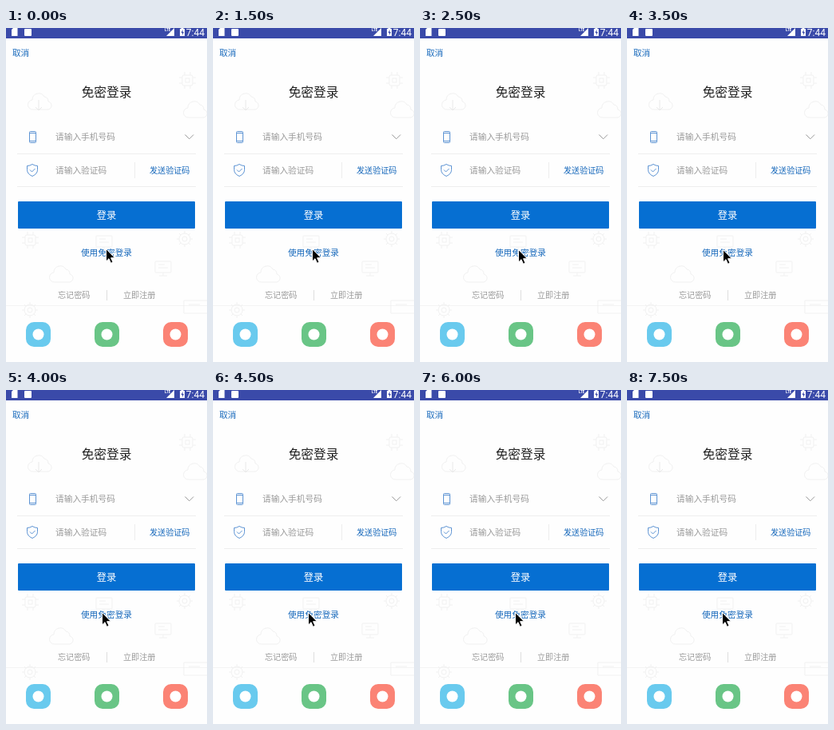
These frames come from a looping animation (252 px wide and 418 px high, 8 s). An HTML page:

```html
<!DOCTYPE html>
<html lang="zh-CN">
<head>
<meta charset="utf-8">
<title>免密登录</title>
<style>
  html, body { margin: 0; width: 100%; height: 100%; overflow: hidden; background: #fefefe; }
  svg { display: block; width: 100%; height: 100%; }
  text { font-family: "Noto Sans CJK SC", "Noto Sans CJK", "Noto Sans", sans-serif; font-size: 10.1px; }
  .mid { text-anchor: middle; }
  .link { fill: #1668bb; }
  .hint { fill: #999; font-size: 10.7px; }
  .small { fill: #999; }
  .clock { font: 12px Roboto, sans-serif; fill: #fff; }
  .lte { font: 700 4.5px Roboto, sans-serif; fill: #fff; }
  .rule { stroke: #eee; }
  .icon { fill: none; stroke: #5c93d3; }
  .doodle { fill: none; stroke: #f1f1f1; }
  .cursor { animation: drift 8s step-end infinite; }
  @keyframes drift {
    0% { transform: translate(125px, 276px); }
    18.75% { transform: translate(124px, 276px); }
    31.25% { transform: translate(123px, 277px); }
    43.75% { transform: translate(120px, 277px); }
    50% { transform: translate(120px, 278px); }
    56.25%, 100% { transform: translate(119px, 278px); }
  }
</style>
</head>
<body>
<svg viewBox="0 0 252 418">
  <defs>
    <path id="cloud" d="M7 23a6 6 0 0 1-1-12 8 8 0 0 1 15-4 6 6 0 0 1 5 6 5 5 0 0 1-2 10z"/>
    <g id="chip">
      <rect x="4" y="4" width="13" height="13" rx="2"/>
      <rect x="8" y="8" width="5" height="5"/>
      <path d="M0 7h4M0 14h4M17 7h4M17 14h4M7 0v4M14 0v4M7 17v4M14 17v4"/>
    </g>
    <g id="gear">
      <circle cx="10" cy="10" r="7"/>
      <circle cx="10" cy="10" r="3"/>
      <path d="M10 0v3M10 17v3M0 10h3M17 10h3M3 3l2 2M15 15l2 2M17 3l-2 2M5 15l-2 2"/>
    </g>
    <g id="screen">
      <rect width="20" height="14" rx="1"/>
      <path d="M4 4h8M4 8h12M10 14v4M5 18h10"/>
    </g>
  </defs>

  <rect width="252" height="418" fill="#fefefe"/>

  <!-- backdrop -->
  <g class="doodle">
    <use href="#cloud" x="27" y="79"/>
    <path d="M41 90v13M37 99l4 4 4-4" stroke="#e9e9e9"/>
    <use href="#chip" x="217" y="55"/>
    <use href="#cloud" x="222" y="89"/>
    <use href="#chip" x="20" y="255"/>
    <use href="#screen" x="113" y="260"/>
    <use href="#gear" x="214" y="254"/>
    <use href="#cloud" x="54" y="295"/>
    <use href="#screen" x="187" y="292"/>
    <use href="#gear" x="20" y="343"/>
    <path d="M223 341h29M223 341v16h29M229 346h14"/>
  </g>

  <!-- status bar -->
  <rect width="252" height="13" fill="#3a4aa9"/>
  <g fill="#fff">
    <path d="M9 0h5.5v10H7V2z"/>
    <rect x="23" y="1" width="9" height="9" rx="1"/>
    <path d="M211 0v10h-10z"/>
    <path d="M218 1h1.5V0h3v1h1.5v9h-6z"/>
  </g>
  <path d="M221.6 2l-2 4h1.4v3l2-4h-1.4z" fill="#3a4aa9"/>
  <text class="lte" x="199" y="4">LTE</text>
  <text class="clock" x="249" y="9.5" text-anchor="end">7:44</text>

  <text class="link" x="8" y="34.5" style="font-size:10.6px">取消</text>
  <text class="mid" x="126" y="86" fill="#222" style="font-size:15.7px">免密登录</text>

  <!-- form -->
  <g class="icon">
    <rect x="29.5" y="129.5" width="8" height="14" rx="1"/>
    <path d="M29.5 131.5h8M29.5 141.5h8"/>
    <path d="M33 170.5q3 2 6.500 2v5q0 5-6.500 8q-6.500-3-6.500-8v-5q3.500 0 6.500-2z"/>
    <path d="M30 177.500l2.500 2.500 4-4"/>
  </g>
  <text class="hint" x="62" y="140">请输入手机号码</text>
  <path d="M224.500 133.500l5.300 5.300 5.300-5.300" fill="none" stroke="#999"/>
  <text class="hint" x="62" y="182">请输入验证码</text>
  <text class="link" x="180" y="181.500">发送验证码</text>
  <path class="rule" d="M14 157.500h224M14 198.500h224M161.500 168v20"/>

  <rect x="15" y="217" width="222" height="34" rx="1" fill="#066fd2"/>
  <text class="mid" x="126" y="238.500" fill="#fff" style="font-size:12.300px">登录</text>
  <text class="link mid" x="126" y="284.500" style="font-size:10.700px">使用免密登录</text>

  <text class="small" x="65" y="338">忘记密码</text>
  <text class="small" x="147" y="338">立即注册</text>
  <path d="M126.500 328v13" stroke="#ddd"/>
  <path class="rule" d="M0 347.500h252" opacity=".6"/>

  <!-- sign-in tiles -->
  <g>
    <rect x="25" y="368" width="31" height="31" rx="10" fill="#69caee"/>
    <rect x="111" y="368" width="31" height="31" rx="10" fill="#69c586"/>
    <rect x="197" y="368" width="31" height="31" rx="10" fill="#fb8375"/>
    <g fill="#fff">
      <circle cx="40.500" cy="383.500" r="7"/>
      <circle cx="126.500" cy="383.500" r="7"/>
      <circle cx="212.500" cy="383.500" r="7"/>
    </g>
  </g>

  <path class="cursor" d="M.5 .5v15.500l3.500-3.300 2.500 5.600 2.600-1.100-2.500-5.500h4.800z"
        fill="#000" stroke="#fff" stroke-width="1" stroke-linejoin="round"/>
</svg>
</body>
</html>
```
